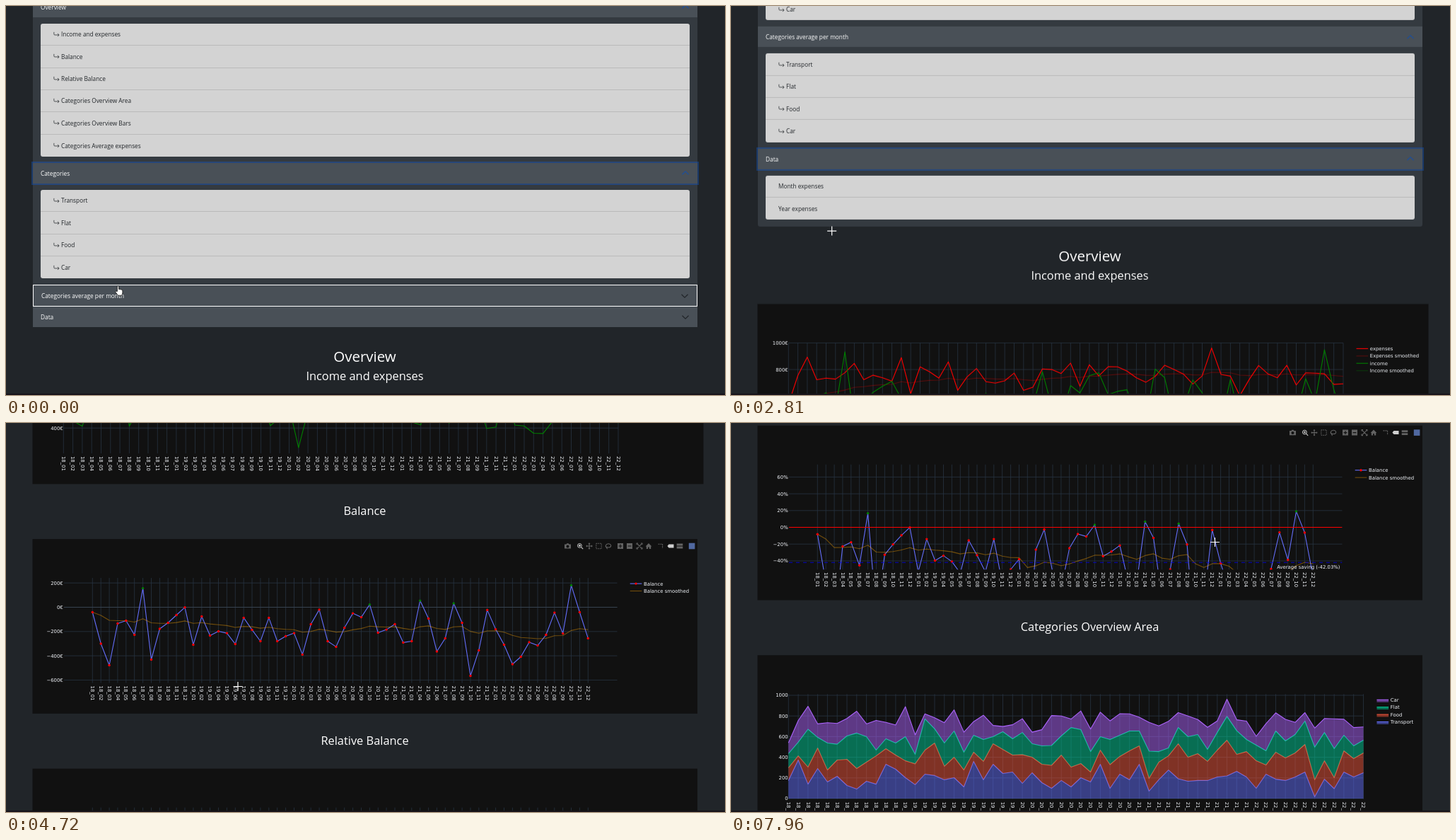
An HTML page that plays this animation: 1017 px wide and 550 px high, repeating every 8 s.

```html
<!DOCTYPE html>
<html lang="en">
<head>
<meta charset="utf-8">
<title>Expenses dashboard</title>
<style>
html, body { margin: 0; width: 100%; height: 100%; overflow: hidden; background: #212529; }
body { position: relative; font: 8.3px/1 "Open Sans", "Noto Sans", sans-serif; }
#page { position: absolute; left: 0; top: -13.2px; width: 1017px; will-change: transform; }
#acc { margin-left: 38px; width: 940px; background: #343a40; border-radius: 0 0 3px 3px; }
.head { position: relative; display: flex; align-items: center; justify-content: space-between;
  height: 28.7px; padding: 0 11px; background: #495057; color: #fff; }
.head span { padding-top: 1px; }
.head svg { width: 12px; height: 12px; fill: none; stroke: #212529; stroke-width: 1.5; }
.head.open svg { stroke: #1d4f9c; }
.head.hover { border: 1px solid #fff; }
.head.focus { z-index: 2; box-shadow: 0 0 0 2px rgba(13, 100, 240, .32); }
.head.hover.focus { border-color: #b4caec; }
.body { overflow: hidden; }
.list { margin: 0 11px; padding: 9.2px 0; }
.item { box-sizing: border-box; height: 31.333px; padding: 1px 0 0 18px; display: flex; align-items: center;
  background: #d3d3d3; color: #212529; border-bottom: 1px solid #bababa; }
.item:first-child { border-radius: 3px 3px 0 0; }
.item:last-child { border-radius: 0 0 3px 3px; border-bottom: 0; }
.item svg { width: 9px; height: 9px; margin-right: 2px; fill: none; stroke: #212529; stroke-width: 1.3; }
#charts { display: block; font: 6.9px "DejaVu Sans", Verdana, sans-serif; fill: #f2f5fa; }
#charts .title { font: 16.4px "Open Sans", "Noto Sans", sans-serif; fill: #fff; text-anchor: middle; }
#charts .big { font-size: 20.5px; }
#charts .end { text-anchor: end; }
#charts path { fill: none; stroke-width: 1.1; stroke-linejoin: round; }
#charts .grid { stroke: #283442; stroke-width: .8; }
.bar path, .bar circle, .bar rect { stroke: #636363; fill: none; }
#charts .bar .solid { fill: #636363; stroke: none; }
#charts .bar .on * { stroke: #cfcfcf; }
#charts .bar .on .solid { fill: #cfcfcf; stroke: none; }
#cursor { position: absolute; left: 0; top: 0; width: 24px; height: 24px; overflow: visible; }
#edge { position: absolute; left: 0; right: 0; bottom: 0; height: 2px; background: #17131a; }
</style>
</head>
<body>
<div id="page"><div id="acc"></div><svg id="charts" width="1017" height="1420"></svg></div>
<svg id="cursor">
  <path id="hand" fill="#fff" stroke="#111" stroke-width=".8" stroke-linejoin="round"
    d="M-2.6 1.5V-5.2a1.1 1.1 0 0 1 2.2 0V-1.6l1.9 .2 1.9 .5 1.5 .8V4L3.8 7.2H-1.6L-5 2.6c-.7-1 .4-1.9 1.2-1.2z"/>
  <path id="ew" fill="none" stroke="#fff" stroke-width="1.1" d="M-5 0H5M-2.6-2.4L-5 0l2.4 2.4M2.6-2.4L5 0 2.6 2.4"/>
  <path id="cross" fill="none" stroke="#fff" stroke-width="1.2" d="M-6.5 0H6.5M0-6.5V6.5"/>
</svg>
<div id="edge"></div>
<script>
const $ = id => document.getElementById(id);

// ---- accordion ----
const groups = ['Transport', 'Flat', 'Food', 'Car'];
const sections = [
  ['Overview', ['Income and expenses', 'Balance', 'Relative Balance', 'Categories Overview Area',
    'Categories Overview Bars', 'Categories Average expenses']],
  ['Categories', groups],
  ['Categories average per month', groups],
  ['Data', ['Month expenses', 'Year expenses']]
];
const arrow = '<svg viewBox="0 0 16 16"><path d="M1.5 1.5v5.3a2 2 0 0 0 2 2h11M10.6 5.2l3.7 3.6-3.7 3.6"/></svg>';
$('acc').innerHTML = sections.map(([name, items]) =>
  `<div class="head"><span>${name}</span><svg viewBox="0 0 16 16"><path d="M2 5l6 6 6-6"/></svg></div>
   <div class="body"><div class="list">${items.map(s =>
     `<div class="item">${name === 'Data' ? '' : arrow}<span>${s}</span></div>`).join('')}</div></div>`).join('');
const heads = [...document.querySelectorAll('.head')];
const bodies = [...document.querySelectorAll('.body')];
const fullHeight = sections.map(s => s[1].length * 31.333 + 18.4);

// ---- data, one value per month ----
const spent = [540, 755, 893, 723, 735, 728, 776, 846, 723, 757, 738, 712,
  890, 617, 820, 783, 735, 858, 643, 745, 807, 708, 698, 715,
  773, 643, 667, 804, 800, 770, 848, 673, 836, 752, 821, 820,
  788, 738, 704, 748, 832, 800, 766, 690, 752, 962, 763, 750,
  603, 725, 830, 767, 738, 832, 683, 775, 772, 768, 688, 693];
const balance = [-41, -300, -478, -134, -111, -227, 157, -431, -178, -128, -64, -1,
  -309, -76, -233, -198, -213, -303, -87, -186, -280, -87, -280, -239,
  -213, -390, -140, -20, -280, -326, -169, -50, -82, 23, -210, -184,
  -140, -291, -280, 55, -93, -364, -256, 32, -128, -565, -355, -23,
  -181, -309, -469, -408, -288, -315, -227, -44, -216, 181, -41, -256];
const transport = [175, 373, 140, 291, 161, 216, 127, 92, 168, 140, 332, 284,
  202, 134, 236, 223, 182, 202, 113, 360, 182, 332, 243, 257,
  147, 250, 154, 99, 175, 113, 202, 161, 332, 99, 236, 182,
  332, 72, 182, 277, 192, 168, 175, 175, 209, 219, 264, 209,
  99, 236, 188, 175, 209, 257, 17, 188, 96, 257, 209, 250];
const foodTop = [298, 414, 305, 490, 277, 373, 380, 291, 353, 414, 483, 421,
  366, 336, 469, 538, 312, 401, 277, 449, 360, 531, 476, 421,
  425, 401, 332, 322, 421, 305, 339, 257, 469, 329, 408, 462,
  510, 195, 353, 414, 531, 401, 435, 360, 469, 565, 428, 455,
  366, 325, 449, 394, 442, 524, 182, 366, 202, 462, 387, 442];
const flatTop = [435, 545, 671, 592, 538, 527, 606, 634, 599, 469, 579, 538,
  599, 428, 771, 675, 538, 654, 449, 613, 572, 599, 647, 579,
  640, 531, 510, 514, 606, 688, 668, 455, 599, 572, 613, 654,
  654, 459, 455, 490, 688, 599, 620, 476, 640, 795, 657, 572,
  517, 462, 654, 558, 620, 750, 497, 640, 483, 613, 510, 565];
const income = spent.map((v, i) => v + balance[i]);
const relative = balance.map((v, i) => 100 * v / income[i]);
const smooth = list => {
  let s = list[0];
  return list.map(v => s += .1 * (v - s));
};
const months = spent.map((_, i) => `${18 + Math.floor(i / 12)}_${String(i % 12 + 1).padStart(2, '0')}`);

// ---- charts ----
const TOP = 109.5, STEP = 324.6, HEIGHT = 246.8, P0 = 55, P1 = 203.5;
const text = (x, y, s, cls = '') => `<text x="${x}" y="${y}" class="${cls}">${s}</text>`;
const path = (d, color, more = '') => `<path d="${d}" stroke="${color}" ${more}/>`;
const trace = (list, x, y) => 'M' + list.map((v, i) => x(i).toFixed(1) + ' ' + y(v).toFixed(1)).join('L');
const dot = (x, y, v) => `<circle cx="${x}" cy="${y}" r="1.7" fill="${v < 0 ? '#f00' : '#008000'}"/>`;

const icons = {
  camera: '<path class="solid" style="fill-rule:evenodd" d="M-4.5-2.6H-2l.8-1.2H1.2L2-2.6H4.5V3.6H-4.5zM0-1.6a2 2 0 1 0 .01 0z"/>',
  zoom: '<circle cx="-.6" cy="-.6" r="2.9"/><path d="M1.6 1.6L4.2 4.2M-2.2-.6H1M-.6-2.2V1"/>',
  pan: '<path d="M-4 0H4M0-4V4M-3-1L-4 0l1 1M3-1l1 1-1 1M-1-3L0-4l1 1M-1 3l1 1 1-1"/>',
  box: '<rect x="-3.7" y="-3.7" width="7.4" height="7.4" stroke-dasharray="1.6 1"/>',
  lasso: '<path d="M-2 2C-5 1-4-3 0-3.3S5 1 1.6 1.8-2.6.4-2.4 2.2-1 3-2 4.2"/>',
  plus: '<path class="solid" style="fill-rule:evenodd" d="M-4-4H4V4H-4zM-.6-2.4V-.6H-2.4V.6H-.6V2.4H.6V.6H2.4V-.6H.6V-2.4z"/>',
  minus: '<path class="solid" style="fill-rule:evenodd" d="M-4-4H4V4H-4zM-2.4-.6V.6H2.4V-.6z"/>',
  auto: '<path d="M-4-2V-4H-2M2-4H4V-2M4 2V4H2M-2 4H-4V2M-3-3L3 3M3-3L-3 3"/>',
  home: '<path class="solid" d="M-4.4 .4L0-4 4.4 .4H3.2V4H.9V1.4H-.9V4H-3.2V.4z"/>',
  spike: '<path d="M-3.5-2.7H2.6V3.5" stroke-dasharray="2 1"/>',
  near: '<path class="solid" d="M-4.5 0l2-2.5H4.5v5H-2.5z"/>',
  compare: '<path class="solid" d="M-4.3-3.4H4.3V-.5H-4.3zM-4.3 .6H4.3V3.5H-4.3z"/>'
};
const modebar = (k, select) => {
  const tail = [['plus', 869], ['minus', 882], ['auto', 896], ['home', 909], ['spike', 926], ['near', 940], ['compare', 953]];
  const front = select
    ? [['camera', 794.5], ['zoom', 812], ['pan', 825], ['box', 838.5], ['lasso', 852]]
    : [['camera', 821], ['zoom', 838.3], ['pan', 852]];
  return `<g class="bar" id="bar${k}">` + [...front, ...tail].map(([n, x]) =>
    `<g transform="translate(${x} 9.9)" class="${n === 'zoom' || n === 'near' ? 'on' : ''}">${icons[n]}</g>`).join('') +
    '<rect x="965.8" y="5.6" width="8.6" height="8.6" style="fill:#5068a0;stroke:none"/></g>';
};

function chart(k, o) {
  const x = i => o.x0 + (o.x1 - o.x0) * i / 59;
  let grid = months.map((_, i) => `M${x(i).toFixed(1)} ${P0}V${P1}`).join('');
  grid += o.ticks.map(v => `M${o.left} ${o.y(v)}H${o.right}`).join('');
  return `<g transform="translate(0 ${TOP + STEP * k})">
    <rect x="37.5" width="${o.width}" height="${HEIGHT}" fill="#111"/>
    <path class="grid" d="${grid}"/>
    <clipPath id="clip${k}"><rect x="${o.left}" y="${P0 - 2}" width="${o.right - o.left}" height="${P1 - P0 + 2}"/></clipPath>
    ${o.ticks.map(v => text(80.7, o.y(v) + 2.5, String(v).replace('-', '−') + o.unit, 'end')).join('')}
    ${months.map((m, i) => `<text transform="translate(${(x(i) - 2.4).toFixed(1)} 207.4) rotate(90)">${m}</text>`).join('')}
    ${o.clip ? `<g clip-path="url(#clip${k})">${o.draw(x, o.y)}</g>` : o.draw(x, o.y)}
    ${o.legend.map(([name, color, alpha, kind], i) => {
      const y = 63 + 10.4 * i, lx = o.legendX;
      return (kind === 'fill' ? `<rect x="${lx}" y="${y}" width="16.6" height="3.4" fill="${color}" opacity=".5"/>` : '') +
        path(`M${lx} ${y}h16.6`, color, `opacity="${alpha}"`) +
        (kind === 'dot' ? dot(lx + 8.3, y, -1) : '') + text(lx + 19.3, y + 2.5, name);
    }).join('')}
    ${o.extra || ''}${modebar(k, o.select)}</g>`;
}

const withDots = list => (x, y) => path(trace(list, x, y), '#636efa') +
  path(trace(smooth(list), x, y), 'orange', 'opacity=".4"') +
  list.map((v, i) => dot(x(i).toFixed(1), y(v).toFixed(1), v)).join('');
const balanceLegend = [['Balance', '#636efa', 1, 'dot'], ['Balance smoothed', 'orange', .4]];
const layers = [['Transport', '#636efa', transport], ['Food', '#ef553b', foodTop],
  ['Flat', '#00cc96', flatTop], ['Car', '#ab63fa', spent]];
const narrow = { width: 940.5, x0: 122.3, x1: 823.3, left: 82, right: 864.5, legendX: 882.7, select: true };
const relY = v => 143.8 - 1.185 * v;

$('charts').innerHTML =
  text(507.5, 48.6, 'Overview', 'title big') + text(507.5, 75.2, 'Income and expenses', 'title') +
  ['Balance', 'Relative Balance', 'Categories Overview Area'].map((s, i) =>
    text(507.5, TOP + STEP * i + HEIGHT + 43.7, s, 'title')).join('') +
  chart(0, {
    width: 949, x0: 81.3, x1: 866, left: 81.3, right: 866, legendX: 884.5,
    y: v => 55 + (1000 - v) * .1878, ticks: [400, 600, 800, 1000], unit: '€',
    draw: (x, y) => path(trace(spent, x, y), '#f00') + path(trace(smooth(spent), x, y), '#f00', 'opacity=".3"') +
      path(trace(income, x, y), '#008000') + path(trace(smooth(income), x, y), '#008000', 'opacity=".35"'),
    legend: [['expenses', '#f00', 1], ['Expenses smoothed', '#f00', .3], ['income', '#008000', 1], ['Income smoothed', '#008000', .35]]
  }) +
  chart(1, {
    ...narrow, y: v => 96.4 - v * .1716, ticks: [200, 0, -200, -400, -600], unit: '€',
    draw: (x, y) => path(`M82 ${y(0)}H864.5`, '#37424f') + withDots(balance)(x, y), legend: balanceLegend
  }) +
  chart(2, {
    ...narrow, clip: true, y: relY, ticks: [60, 40, 20, 0, -20, -40], unit: '%',
    draw: (x, y) => withDots(relative)(x, y) + path(`M82 ${y(0)}H864.5`, '#f00') +
      path(`M82 ${y(-42.03)}H864.5`, '#00f', 'stroke-dasharray="5 5" opacity=".75"'),
    legend: balanceLegend, extra: text(861.5, 202.4, 'Average saving (-42.03%)', 'end')
  }) +
  chart(3, {
    width: 940.5, x0: 81.3, x1: 894.5, left: 81.3, right: 894.5, legendX: 913.5,
    y: v => 202.7 - v * .146, ticks: [0, 200, 400, 600, 800, 1000], unit: '',
    draw: (x, y) => layers.map(([, color, top], i) => {
      const d = trace(top, x, y), low = i ? layers[i - 1][2] : top.map(() => 0);
      const back = low.map((v, j) => `L${x(j).toFixed(1)} ${y(v).toFixed(1)}`).reverse().join('');
      return `<path d="${d}${back}Z" style="fill:${color};stroke:none" opacity=".5"/>` + path(d, color);
    }).join(''),
    legend: layers.map(([n, c]) => [n, c, 1, 'fill']).reverse()
  });

// ---- timeline ----
const LOOP = 8000;
const ticks = [0, 130, 260, 400, 520, 640, 790, 910, 1060, 1190, 1340, 1460, 1590, 1740, 1860, 2010, 2140, 2290, 2420,
  2570, 2690, 2820, 2940, 3070, 3190, 3310, 3430, 3550, 3670, 3790, 3940, 4060, 4210, 4340, 4470, 4600, 4720, 4860,
  5010, 5130, 5280, 5420, 5550, 5710, 5830, 5950, 6090, 6210, 6340, 6460, 6610, 6740, 6890, 7020, 7170, 7300,
  7450, 7570, 7690, 7840, 7960];
const scroll = [[910, 0], [1060, 100.5], [1190, 150], [1340, 190], [1460, 245], [1590, 280], [2420, 280],
  [2570, 310], [2940, 480], [3310, 640], [3430, 648], [3550, 660], [3790, 750], [4060, 820], [4340, 900],
  [4600, 942], [4720, 947], [4860, 1077], [5010, 1182], [5130, 1207], [5280, 1207], [5420, 1277], [5550, 1307],
  [5710, 1367], [5830, 1417], [5950, 1432]];
const pointX = [[0, 160], [260, 163], [640, 167], [910, 172], [1590, 172], [1860, 130], [2010, 129], [2570, 129],
  [3430, 227], [3670, 240], [4720, 328], [5130, 341], [5950, 414], [6460, 470], [6740, 484], [7020, 501],
  [7300, 509], [7450, 580], [7570, 699], [7690, 605], [7840, 749], [7960, 684.5]];
const pointY = [[0, 402], [260, 408], [640, 414], [910, 403], [1590, 403], [1860, 318], [2010, 314], [2570, 314],
  [3430, 343.5], [3670, 350], [4720, 372.5], [5130, 391], [5950, 395.5], [6460, 336], [6740, 204], [7020, 167],
  [7300, 161], [7690, 161], [7840, 172], [7960, 168.5]];
const open = [[[0, 1]], [[0, 1]], [[260, 0], [400, .14], [520, .8], [640, 1]], [[2010, 0], [2140, .18], [2290, .75], [2420, 1]]];
const bars = [[[2690, 0], [2940, 1], [3790, 1], [4060, 0]], [[3940, 0], [4210, 1], [4860, 1], [5130, 0]],
  [[4860, 0], [5280, 1], [5710, 1], [5950, .3], [6090, 0], [6340, 0], [6740, .8], [6890, 1]],
  [[5710, 0], [5830, .6], [5950, 1], [6340, 1], [6610, .2], [6740, 0]]];

function at(keys, t) {
  const n = keys.findIndex(k => k[0] > t);
  if (n === 0) return keys[0][1];
  if (n < 0) return keys[keys.length - 1][1];
  const [t0, a] = keys[n - 1], [t1, b] = keys[n];
  return a + (b - a) * (t - t0) / (t1 - t0);
}

function draw(t) {
  const hover = t < 1190 ? 2 : t >= 1740 && t < 2690 ? 3 : -1;
  const focus = t < 400 ? 1 : t < 2010 ? 2 : 3;
  heads.forEach((h, i) => {
    const f = at(open[i], t);
    h.classList.toggle('hover', i === hover);
    h.classList.toggle('focus', i === focus);
    h.classList.toggle('open', f > 0);
    h.lastElementChild.style.transform = `rotate(${-180 * f}deg)`;
    bodies[i].style.height = f * fullHeight[i] + 'px';
  });
  bars.forEach((keys, i) => $('bar' + i).style.opacity = at(keys, t));
  $('page').style.transform = `translateY(${-at(scroll, t)}px)`;
  $('cursor').style.transform = `translate(${at(pointX, t)}px, ${at(pointY, t)}px)`;
  const kind = t < 2690 ? 'hand' : t >= 3310 && t < 3670 ? 'ew' : 'cross';
  for (const id of ['hand', 'ew', 'cross']) $(id).style.display = id === kind ? '' : 'none';
}

let last = -1;
function frame() {
  const now = performance.now() % LOOP;
  const t = ticks.filter(k => k <= now).pop();
  if (t !== last) draw(last = t);
  requestAnimationFrame(frame);
}
frame();
</script>
</body>
</html>
```
